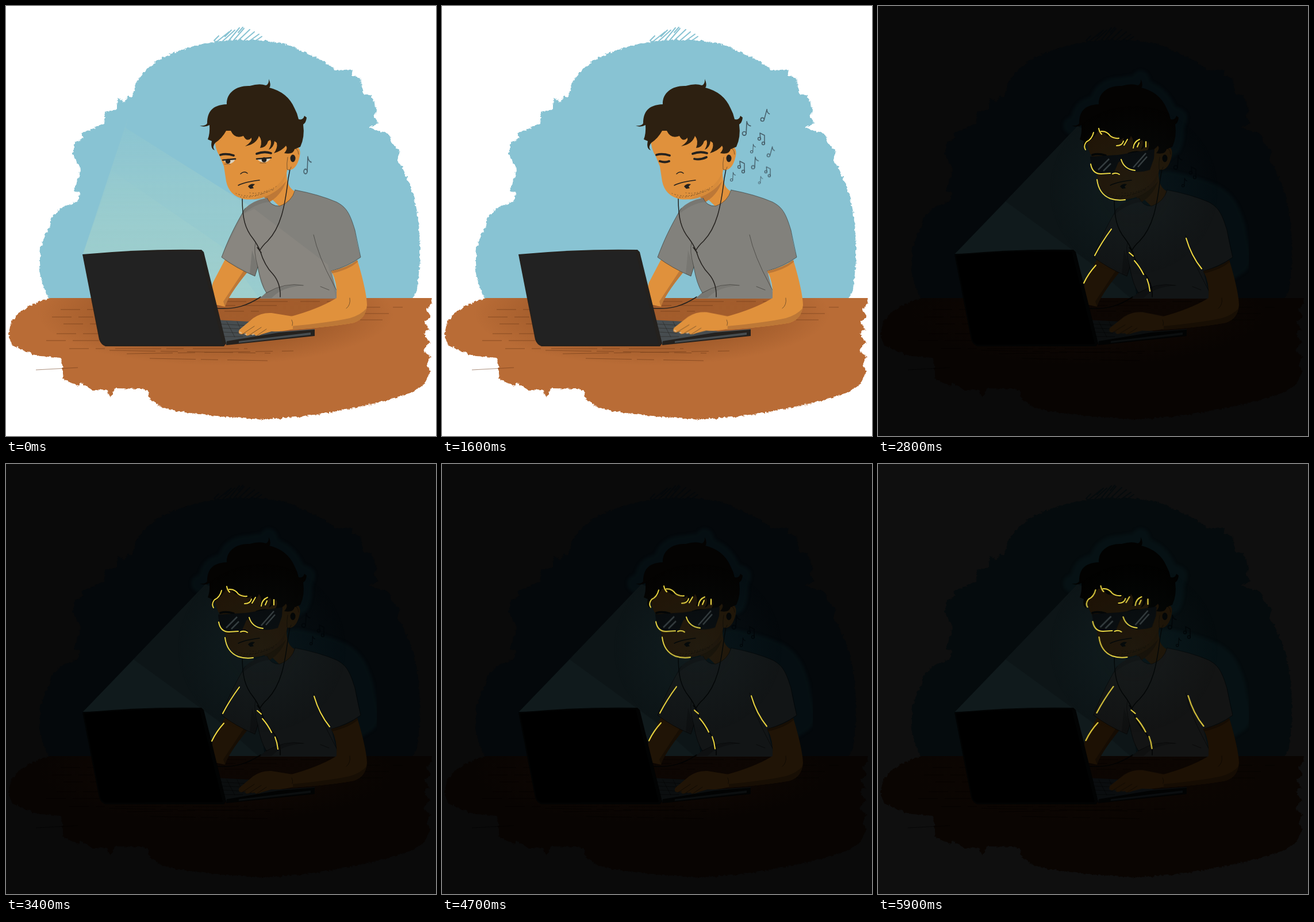
These frames come from a looping animation (748x748 px, 6.2 s). An HTML page without scripts:

```html
<!DOCTYPE html>
<html lang="en">
<head>
<meta charset="utf-8">
<title>Working late</title>
<style>
html, body { margin: 0; width: 100%; height: 100%; overflow: hidden; }
svg { display: block; width: 100vw; height: 100vh; background: var(--bg); }
svg, .head, .hand, .lid, .eyes, .dayBeam, .night, .flow { animation: 6.2s step-end infinite; }
svg { animation-name: light; }
.head { animation-name: nod; }
.hand { animation-name: type; transform-origin: 500px 552px; }
.eyes { animation-name: open; }
.lid { animation-name: shut; }
.dayBeam { animation-name: beam; }
.night { animation-name: night; }
.drift { animation: drift 6.2s linear infinite; }
.first { animation-name: first; }
.second { animation-name: second; }
.third { animation-name: third; }
.start { animation-name: start; }

.sky { fill: var(--sky); }
.tuft { fill: none; stroke: var(--sky); stroke-width: 2; stroke-linecap: round; }
.desk { fill: var(--desk); }
.skin { fill: var(--skin); }
.shade { fill: var(--shade); }
.hair { fill: var(--hair); }
.shirt { fill: var(--shirt); }
.fold { fill: var(--fold); }
.case { fill: var(--case); }
.keys { fill: var(--keys); }
.ink { fill: var(--ink); }
.line { fill: none; stroke: var(--ink); stroke-width: 1.5; stroke-linecap: round; stroke-linejoin: round; }
.thin { stroke-width: .8; opacity: .65; }
.bold { stroke-width: 3.8; }
.grain { fill: none; stroke: var(--grain); stroke-width: .8; opacity: .7; }
.notes { fill: none; stroke: var(--note); stroke-width: 1.5; stroke-linecap: round; stroke-linejoin: round; }
.solo { opacity: var(--solo); }
.rim { fill: none; stroke: #f3dc42; stroke-width: 2; stroke-linecap: round; }

@keyframes light {
  0% { --bg:#fff; --sky:#88c3d3; --desk:#b96c36; --dark:#87491f; --grain:#693716; --skin:#e0913c; --shade:#bd7837; --hair:#2d2011; --shirt:#82817c; --fold:#787772; --case:#222; --keys:#474d50; --ink:#24211e; --white:#ddd2bc; --note:#465e69; --solo:1; }
  38.7% { --bg:#121212; --sky:#0d0e0f; --desk:#0c0703; --dark:#080502; --grain:#1a0d03; --skin:#180e03; --shade:#130a02; --hair:#010101; --shirt:#0d0f10; --fold:#0b0d0e; --case:#000; --keys:#0b0f11; --ink:#020202; --white:#181005; --note:#071417; --solo:1; }
  40.32%, 69.35% { --bg:#0a0a0a; --sky:#04080b; --desk:#080402; --dark:#120803; --grain:#030100; --skin:#201406; --shade:#170e04; --hair:#040302; --shirt:#121516; --fold:#0e1011; --case:#000; --keys:#0b0e0f; --ink:#020303; --white:#201406; --note:#020609; --solo:0; }
  64.51%, 95.16%, 100% { --bg:#0f0f0f; --sky:#050b0d; --desk:#0a0502; --dark:#0e0602; --grain:#030100; --skin:#1d1104; --shade:#150c03; --hair:#020201; --shirt:#131414; --fold:#0f1010; --case:#000; --keys:#0a0d0f; --ink:#020303; --white:#1d1104; --note:#020608; --solo:0; }
}
@keyframes nod {
  0%, 6.45%, 16.12%, 25.8%, 35.48%, 40.32%, 100% { transform: none; }
  3.22%, 12.9%, 22.58%, 32.25%, 38.7% { transform: translate(-5px, 5px); }
}
@keyframes type {
  0%, 6.45%, 16.12%, 22.58%, 29.03%, 35.48%, 54.83%, 75.8%, 85.48% { transform: none; }
  3.22%, 12.9%, 19.35%, 25.8%, 32.25%, 45.16%, 59.67%, 80.64%, 95.16%, 100% { transform: rotate(2deg) translateX(-2px); }
}
@keyframes open { 0%, 32.25%, 100% { opacity: 1; } 19.35% { opacity: 0; } }
@keyframes shut { 0%, 32.25%, 100% { opacity: 0; } 19.35% { opacity: 1; } }
@keyframes beam { 0%, 16.12%, 32.25% { opacity: 1; } 9.67%, 25.8%, 38.7%, 100% { opacity: 0; } }
@keyframes night { 0% { opacity: 0; } 40.32%, 100% { opacity: 1; } }
@keyframes drift {
  0%, 54.83% { transform: none; animation-timing-function: steps(4, end); }
  75.8% { transform: translate(2px, -.7px); animation-timing-function: steps(4, end); }
  95.16%, 100% { transform: translate(3.5px, -1px); }
}
@keyframes start { 0% { opacity: 1; } 3.22%, 100% { opacity: 0; } }
@keyframes first {
  0% { opacity: 0; transform: translate(520px, 275px) scale(.5); }
  3.22% { opacity: 1; transform: translate(522px, 277px) scale(.65); }
  6.45% { opacity: 1; transform: translate(527px, 275px) scale(.9); }
  9.67% { transform: translate(533px, 272px); }
  12.9% { transform: translate(541px, 262px); }
  16.12% { transform: translate(540px, 250px); }
  19.35% { transform: translate(536px, 237px); }
  22.58% { transform: translate(531px, 225px); }
  25.8% { transform: translate(528px, 213px); }
  32.25% { transform: translate(530px, 209px); }
  38.7% { opacity: 1; transform: translate(531px, 205px); }
  40.32%, 100% { opacity: 0; transform: translate(531px, 205px); }
}
@keyframes second {
  0% { opacity: 0; transform: translate(520px, 285px) scale(.5); }
  16.12% { opacity: 1; transform: translate(522px, 282px) scale(.5); }
  19.35% { transform: translate(528px, 279px) scale(.6); }
  22.58% { transform: translate(535px, 276px) scale(.7); }
  25.8% { transform: translate(543px, 273px) scale(.85); }
  32.25% { transform: translate(532px, 275px) scale(.9); }
  38.7% { transform: translate(524px, 276px); }
  40.32%, 54.83% { transform: translate(520px, 272px); }
  50%, 64.51%, 70.96% { transform: translate(515px, 273px); }
  75.8%, 95.16% { transform: translate(510px, 275px); }
  85.48% { transform: translate(517px, 273px); }
  100% { opacity: 1; transform: translate(510px, 275px); }
}
@keyframes third {
  0% { opacity: 0; transform: translate(530px, 235px); }
  9.67% { opacity: 1; transform: translate(557px, 211px); }
  12.9% { opacity: 1; transform: translate(595px, 222px); }
  19.35% { opacity: 0; transform: translate(510px, 290px); }
  25.8% { opacity: 1; transform: translate(520px, 280px); }
  29.03% { opacity: 1; transform: translate(545px, 272px); }
  32.25% { transform: translate(580px, 262px); }
  38.7% { opacity: 1; transform: translate(594px, 252px); }
  40.32%, 100% { opacity: 0; transform: none; }
}
</style>
</head>
<body>
<svg viewBox="0 0 748 748">
<defs>
  <filter id="rough" color-interpolation-filters="sRGB">
    <feTurbulence type="fractalNoise" baseFrequency=".16" numOctaves="3" seed="4"/>
    <feDisplacementMap in="SourceGraphic" scale="7" xChannelSelector="R" yChannelSelector="G"/>
  </filter>
  <filter id="soft"><feGaussianBlur stdDeviation="3"/></filter>
  <linearGradient id="ray" x1="0" y1="1" x2="0" y2="0">
    <stop offset="0" stop-color="#d2eac0" stop-opacity=".24"/>
    <stop offset=".6" stop-color="#d2eac0" stop-opacity=".17"/>
    <stop offset="1" stop-color="#d2eac0" stop-opacity=".03"/>
  </linearGradient>
  <radialGradient id="stain">
    <stop offset=".6" style="stop-color:var(--dark)" stop-opacity=".45"/>
    <stop offset="1" style="stop-color:var(--dark)" stop-opacity="0"/>
  </radialGradient>
  <radialGradient id="glow">
    <stop offset="0" stop-color="#3b7078" stop-opacity=".08"/>
    <stop offset="1" stop-color="#3b7078" stop-opacity="0"/>
  </radialGradient>
  <clipPath id="deskTop"><path d="M0,508H748V748H0Z"/></clipPath>
  <clipPath id="wall"><path d="M0,0H748V509H0Z"/></clipPath>
  <path id="body" d="M454,334Q430,338 416,352C396,386 386,408 375,437Q400,456 433,470L438,454Q443,484 453,499L442,509H578L566,461Q595,453 617,437Q611,415 607,390C598,360 592,350 575,341Q545,328 503,320Q497,341 476,348Q461,348 454,334Z"/>
  <path id="mop" d="M337,208Q348,209 350,204C350,185 358,172 384,171C383,150 402,138 424,139Q441,134 452,138Q458,136 457,127Q462,138 458,142Q490,150 502,178Q507,187 509,197Q517,199 519,191L523,194Q522,203 517,206Q520,228 512,245L502,249Q500,259 484,256Q491,248 487,243Q480,252 466,256Q473,247 471,238L467,235Q466,246 457,250Q463,240 460,233L456,235Q453,246 442,247Q447,234 440,226Q436,240 416,244Q429,236 427,229Q419,238 413,226Q398,232 391,217L383,217Q376,230 364,238Q358,245 363,251Q355,248 358,235L351,232Q355,222 354,207Q345,212 337,208Z"/>
  <g id="note"><circle cx="-2" cy="8" r="3"/><path d="M1,8L2,-11Q3,-5 8,-4"/></g>
  <g id="pair"><circle cx="-3" cy="0" r="2.4"/><circle cx="4" cy="8" r="2.4"/><path d="M-1,0L-2,-10L6,-6V8"/></g>
  <g id="duo"><use href="#pair"/><use href="#note" transform="translate(-15 17) scale(.7)"/></g>
  <g id="cluster">
    <use href="#note" transform="scale(1.1)"/>
    <use class="solo" href="#note" transform="translate(33 -23) rotate(12)"/>
    <use href="#duo" x="27" y="18"/>
  </g>
</defs>

<path class="sky" filter="url(#rough)" d="M77,512C59,480 55,450 60,420C66,395 80,385 80,368L98,350 125,340 130,325 118,322 130,285 116,257 119,240 135,228 131,222 170,205 173,185 192,180 195,160 205,168 212,157 222,158 224,140C240,105 270,90 300,78L345,65 378,60 415,58 450,60C500,66 545,90 575,112L603,110 601,120 617,127 622,152 636,156 646,184 638,190 648,203 632,212 665,222 672,238 684,250 681,268Q717,325 719,400Q724,460 709,512Z"/>
<path class="tuft" d="M362,60L370,52M368,61L388,45M376,62L398,42M386,62L406,38M394,62L414,39M402,62L424,41M412,62L432,45M422,62L440,49M432,62L445,53M381,53L392,42M404,46L412,37"/>

<g class="night">
  <g clip-path="url(#wall)" opacity=".13">
    <g filter="url(#soft)" fill="#17424b" stroke="#17424b" stroke-linejoin="round">
      <use href="#mop" stroke-width="30"/>
      <use href="#body" stroke-width="66"/>
    </g>
  </g>
  <path d="M134,431L347,209 420,240 450,509H366L341,425Z" fill="#0d1517"/>
  <path d="M134,431L222,340 368,446 440,509H366L341,425Z" fill="#101a1c"/>
</g>
<g class="dayBeam" fill="url(#ray)">
  <path d="M134,431L215,186 208,212 440,358 470,508H366L341,425Z"/>
  <path d="M134,431L185,287 375,418 440,508H366L341,425Z" opacity=".4"/>
</g>

<g clip-path="url(#deskTop)">
  <path class="desk" filter="url(#rough)" d="M92,500L738,500 741,518 731,527 739,540 728,550 736,562 726,570 738,585 726,598 738,610 732,625 738,635Q735,650 722,662C690,685 620,695 570,706Q500,717 450,719C380,716 300,708 268,697L250,684 246,670 235,666 190,665 182,680 175,667 150,668 130,655 125,662 100,648 97,625 95,612 50,608 10,590 4,570 10,548Q30,520 78,508Z"/>
  <ellipse cx="365" cy="535" rx="310" ry="90" fill="url(#stain)"/>
</g>
<g class="grain">
  <path stroke-dasharray="34 12 60 22" d="M95,528H152M80,541H152M100,553H158M88,570H160M70,582H162M110,596H172M384,514H570M365,521H490M380,531H440M545,524H690M560,535H670M570,546H655"/>
  <path stroke-dasharray="80 9 30 16" d="M180,599L460,604M210,605L500,600M250,613L455,617M190,596H420"/>
  <path d="M52,633L125,629"/>
</g>

<path class="skin" d="M381,441L360,481Q355,495 366,520L381,523Q385,505 419,464Z"/>
<path class="shade" d="M413,461L378,514 381,523Q388,502 419,464Z"/>
<path class="skin" d="M448,322L488,290Q488,315 502,322Q495,348 475,348 456,345Z"/>
<path class="shade" d="M449,332Q474,322 487,305Q479,330 455,343Z"/>
<use class="shirt" href="#body"/>
<g class="dayBeam"><path d="M432,353L560,450 574,508H442L453,499 438,454 433,470 375,437 412,362Z" fill="#cbb9a0" opacity=".11"/></g>
<path class="fold" d="M428,425L438,454 433,470 424,466ZM452,499Q490,481 520,486Q480,488 462,508H442ZM414,354Q430,338 454,334L457,341Q434,343 410,364Z"/>
<path class="line thin" d="M416,352C396,386 386,408 375,437Q400,456 433,470L438,454Q430,425 434,412M503,320Q545,328 575,341C592,350 598,360 607,390L617,437Q595,453 566,461M454,334Q461,349 476,348 497,341 503,320M535,398Q543,435 570,485Q577,495 578,506M453,499Q485,480 517,486M438,454Q443,484 453,499M547,488L562,494"/>

<path class="line" d="M411,334C411,370 416,388 430,405Q438,416 442,426Q450,452 464,466Q478,482 477,506M497,268L491,300C485,350 478,385 455,409Q446,417 441,426M437,420L444,429M368,526C400,528 420,521 443,506"/>

<path class="keys" d="M366,546L424,549 480,566 537,562V573L383,589Z"/>
<path class="ink" d="M384,583L475,568 537,563V574L383,590Z"/>
<path class="keys" d="M405,583L530,568V572L405,586Z"/>
<path class="line thin" d="M370,553L420,556M373,560L412,562M376,567L408,569M378,575L412,575M384,549L398,576M402,549L410,566"/>

<path class="skin" d="M566,461Q593,455 611,442C620,470 628,505 628,520Q626,544 605,551Q560,559 495,563L492,541Q542,528 575,508Q577,482 566,461Z"/>
<path class="shade" d="M627,526Q624,545 605,551Q560,559 495,563V557Q560,551 598,543Q618,537 627,526ZM566,461Q593,455 611,442L612,445Q596,459 567,465Z"/>
<path class="line thin" d="M598,508Q600,520 592,526"/>
<g class="hand">
  <path class="skin" d="M499,540L462,534Q444,533 430,543L406,563Q402,571 411,571L417,569Q415,576 425,572L432,571Q434,576 445,571L462,566Q480,567 499,562Z"/>
  <path class="line thin" d="M411,571L432,557M424,572L444,559M437,573L453,562M497,546Q500,551 498,556"/>
  <path d="M406,567L410,569M415,571L419,571M428,572L432,571" stroke="var(--white)" stroke-width="2" opacity=".6"/>
</g>

<path class="ink" d="M133,432Q240,422 340,424L344,428 383,587 379,592 173,592Q165,589 162,580Z"/>
<path class="case" d="M136,434Q240,425 337,427L377,588 174,589Q166,587 164,579Z"/>

<g class="head">
  <path class="skin" d="M363,228Q363,248 372,262L379,279 383,305Q388,330 414,336Q450,340 478,315Q487,303 489,285Q505,288 511,261Q514,243 500,245L505,205H370Z"/>
  <path class="shade" d="M430,337Q455,337 478,315 486,302 487,290Q478,312 455,323 440,330 430,337Z" opacity=".25"/>
  <path class="line thin" d="M498,249Q508,244 509,258M490,263Q488,274 489,284 494,288 496,280"/>
  <use class="hair" href="#mop"/>
  <path class="line bold" d="M373,259Q383,256 396,260M436,257Q449,252 461,256"/>
  <g class="eyes">
    <path fill="var(--white)" d="M378,267L399,266Q396,274 387,275 380,272 378,267ZM437,266L461,264Q456,273 447,272 440,271 437,266Z"/>
    <circle class="ink" cx="386" cy="270" r="4.3"/><circle class="ink" cx="449" cy="267.5" r="4.3"/>
    <path class="line" style="stroke-width:2.6" d="M377,268L399,266M436,266L461,264"/>
    <path class="line thin" d="M380,275H390M442,273H452"/>
  </g>
  <path class="lid line bold" d="M379,270Q388,273 395,270M439,266Q450,268 460,263"/>
  <path class="line" d="M408,292Q414,286 420,291M404,312Q415,306 441,303"/>
  <path class="ink" d="M421,314Q425,308 433,310L429,314 431,317 425,318Z"/>
  <path class="line thin" stroke-dasharray="1 4 2 3" d="M400,326Q425,337 466,319M408,332Q435,336 470,314M424,325Q442,328 458,319"/>
  <ellipse class="ink" cx="499" cy="265" rx="4.5" ry="6.5"/>
  <g class="night">
    <g class="drift">
      <path fill="#07090b" d="M369,262L418,259 481,249 480,265 473,285Q448,293 430,283L422,270 418,272 410,291Q392,296 379,291 370,282 369,262Z"/>
      <path d="M383,285L402,266M392,287L405,274M444,281L466,256M452,280L468,262" fill="none" stroke="#353b3d" stroke-width="2.5"/>
      <path class="rim" d="M370,275Q373,292 388,292L404,291M423,267Q428,284 447,286M408,292Q415,289 420,293M381,302Q384,327 404,335 416,339 430,337"/>
      <path class="rim" d="M362,237Q357,244 361,250M363,236Q372,232 375,220M384,213Q385,219 389,223M388,218Q398,217 404,226 411,231 419,230M415,243Q425,243 427,235M428,242L434,232M444,247Q445,236 455,232M451,245L454,238M466,236L466,245"/>
    </g>
  </g>
</g>

<g class="night">
  <ellipse cx="445" cy="320" rx="150" ry="150" fill="url(#glow)"/>
  <g class="drift">
    <path class="rim" d="M406,388Q389,411 377,434M379,451Q366,465 358,482M437,429L444,435M446,443Q455,453 462,467M468,475Q472,485 473,496M536,404Q545,435 563,457"/>
  </g>
</g>

<g class="notes">
  <g class="flow start"><use href="#note" transform="translate(523 277) scale(1 1.35)"/></g>
  <g class="flow first"><use href="#cluster"/></g>
  <g class="flow second"><use href="#cluster"/></g>
  <g class="flow third"><use href="#duo"/></g>
</g>
</svg>
</body>
</html>
```
